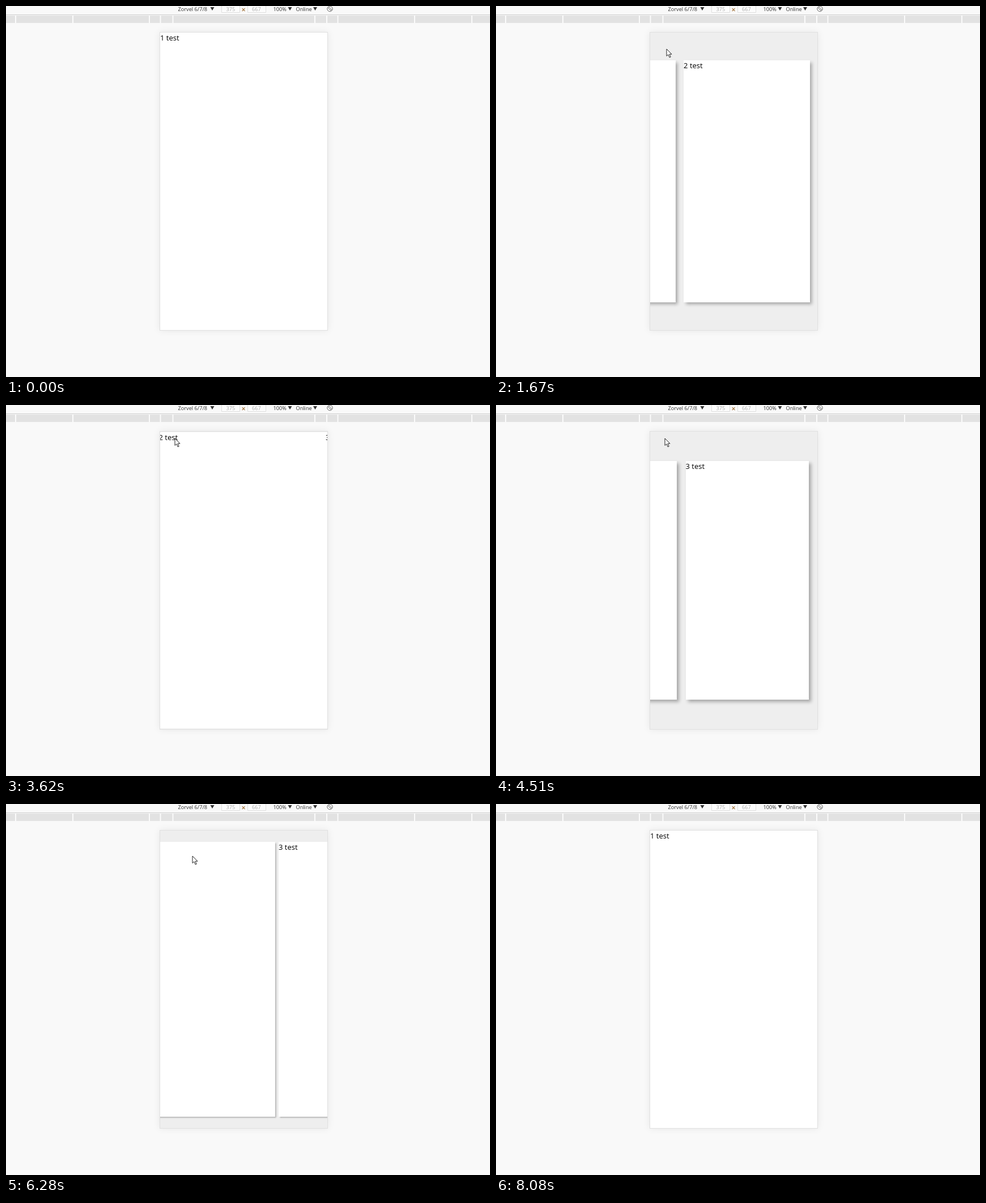
Animation, 854 px wide and 656 px high, one loop 8.69 s. Source, as an HTML page:

```html
<!DOCTYPE html>
<html lang="en">
<head>
<meta charset="utf-8">
<title>Card slider</title>
<style>
  html, body { margin: 0; width: 100%; height: 100%; overflow: hidden; background: #f9f9f9; }
  #stage { position: absolute; left: 0; top: 0; width: 854px; height: 656px; overflow: hidden; }
  svg { position: absolute; left: 0; top: 0; }
  #bar text { font: 9.2px "Open Sans", "Noto Sans", sans-serif; fill: #333; }
  #bar .size { fill: #aaa; text-anchor: middle; }
  #device {
    position: absolute; left: 272px; top: 47px; width: 295px; height: 526px;
    overflow: hidden; background: #eee;
  }
  #frame {
    position: absolute; left: 271px; top: 46px; width: 297px; height: 528px; box-sizing: border-box;
    border: 1px solid #e0e0e0; box-shadow: 0 0 12px rgba(0, 0, 0, .08);
  }
  .card {
    position: absolute; background: #fff; color: #000; white-space: nowrap;
    font: 13px/19px "Open Sans", "Noto Sans", sans-serif;
  }
</style>
</head>
<body>
<div id="stage">
  <svg id="bar" width="854" height="32">
    <path d="M0 15.5H854" stroke="#cbcbcb"/>
    <path d="M0 17H854V30H0Z" fill="#e2e2e2"/>
    <g id="ticks" stroke="#fbfbfb" stroke-width="2"></g>
    <text x="303.5" y="9">Zorvel 6/7/8</text>
    <text x="471.5" y="9">100%</text>
    <text x="511.5" y="9">Online</text>
    <path d="M360.5 2h7l-3.5 6zM497.5 2h7l-3.5 6zM542 2h7l-3.5 6z" fill="#333"/>
    <path d="M380.5 -2V11.5H412.5V-2M426.5 -2V11.5H458.5V-2" fill="#fcfcfc" stroke="#dedede"/>
    <text class="size" x="396.5" y="9">375</text>
    <text class="size" x="442" y="9">667</text>
    <path d="M416.7 4.2l4.8 4.8m0 -4.8l-4.8 4.8" stroke="#a5763f" stroke-width="1.2"/>
    <g fill="none" stroke="#666">
      <circle cx="571.5" cy="5" r="4.7"/>
      <path d="M568.6 3.6l1.6 -1.6l4.4 4.4l-1.6 1.6z"/>
    </g>
  </svg>
  <div id="frame"></div>
  <div id="device"></div>
  <svg id="cursor" width="14" height="20" viewBox="-1 -1 14 20">
    <path d="M0 0V12.5L2.9 9.9L5.2 15L7.2 14.1L5 9.2H9Z" fill="#fff" stroke="#222" stroke-width="1"/>
  </svg>
</div>
<script>
const LOOP = 8690, W = 295, H = 526;
const SHRINK = 1000, SLIDE = 1070, GROW_AT = 1060, GROW = 1000;

const runs = [
  { at: 1000, from: 0, to: 1 },
  { at: 3600, from: 1, to: 2 },
  { at: 6040, from: 2, to: 0 }
];

// time, x, y of the pointer tip
const path = [
  [110, 767, 640], [300, 520, 320], [480, 350, 120], [640, 288, 56], [750, 300, 75],
  [2900, 300, 75], [3110, 297, 58], [5430, 297, 58], [5620, 328, 91],
  [7640, 328, 91], [7720, 520, 290], [7800, 771, 576], [7850, 813, 645], [7900, 850, 700]
];

const device = document.getElementById("device");
const cursor = document.getElementById("cursor");

document.getElementById("ticks").innerHTML =
  [17, 118, 253, 272.5, 294.5, 545, 566, 585.5, 721, 822]
    .map(x => `<path d="M${x} 17V30"/>`).join("");

const cards = [1, 2, 3].map(n => {
  const card = document.createElement("div");
  card.className = "card";
  card.textContent = n + " test";
  device.append(card);
  return card;
});

const clamp = v => Math.min(1, Math.max(0, v));

// cubic-bezier(.25, .1, .25, 1)
function ease(v) {
  const x = clamp(v);
  let lo = 0, hi = 1;
  for (let i = 0; i < 24; i++) {
    const p = (lo + hi) / 2;
    if (.75 * p * (1 - p) + p ** 3 < x) lo = p; else hi = p;
  }
  const q = 1 - lo;
  return .3 * q * q * lo + 3 * q * lo * lo + lo ** 3;
}

function drawCards(t) {
  let pos = 0, small = 0;
  for (const run of runs) {
    const d = t - run.at;
    if (d < 0) break;
    pos = run.from + (run.to - run.from) * ease(d / SLIDE);
    small = ease(d / SHRINK) * (1 - ease((d - GROW_AT) / GROW));
  }
  const width = W * (1 - .264 * small);
  const height = H * (1 - .2 * small);
  const pitch = width + 15.2 * small;
  const middle = W / 2 + small * (19.3 * pos - 17.5);
  cards.forEach((card, i) => {
    const s = card.style;
    s.left = middle + (i - pos) * pitch - width / 2 + "px";
    s.top = (H - height) / 2 + "px";
    s.width = width + "px";
    s.height = height + "px";
    s.boxShadow = `${4 * small}px ${4 * small}px ${6 * small}px rgba(0,0,0,.3)`;
  });
}

function drawCursor(t) {
  const next = path.findIndex(p => p[0] > t);
  cursor.style.display = next > 0 ? "" : "none";
  if (next < 1) return;
  const [t0, x0, y0] = path[next - 1], [t1, x1, y1] = path[next];
  const k = (t - t0) / (t1 - t0);
  cursor.style.left = x0 + (x1 - x0) * k - .5 + "px";
  cursor.style.top = y0 + (y1 - y0) * k - .5 + "px";
}

const start = performance.now();
function draw() {
  const t = (performance.now() - start) % LOOP;
  drawCards(t);
  drawCursor(t);
  requestAnimationFrame(draw);
}
draw();
</script>
</body>
</html>
```
